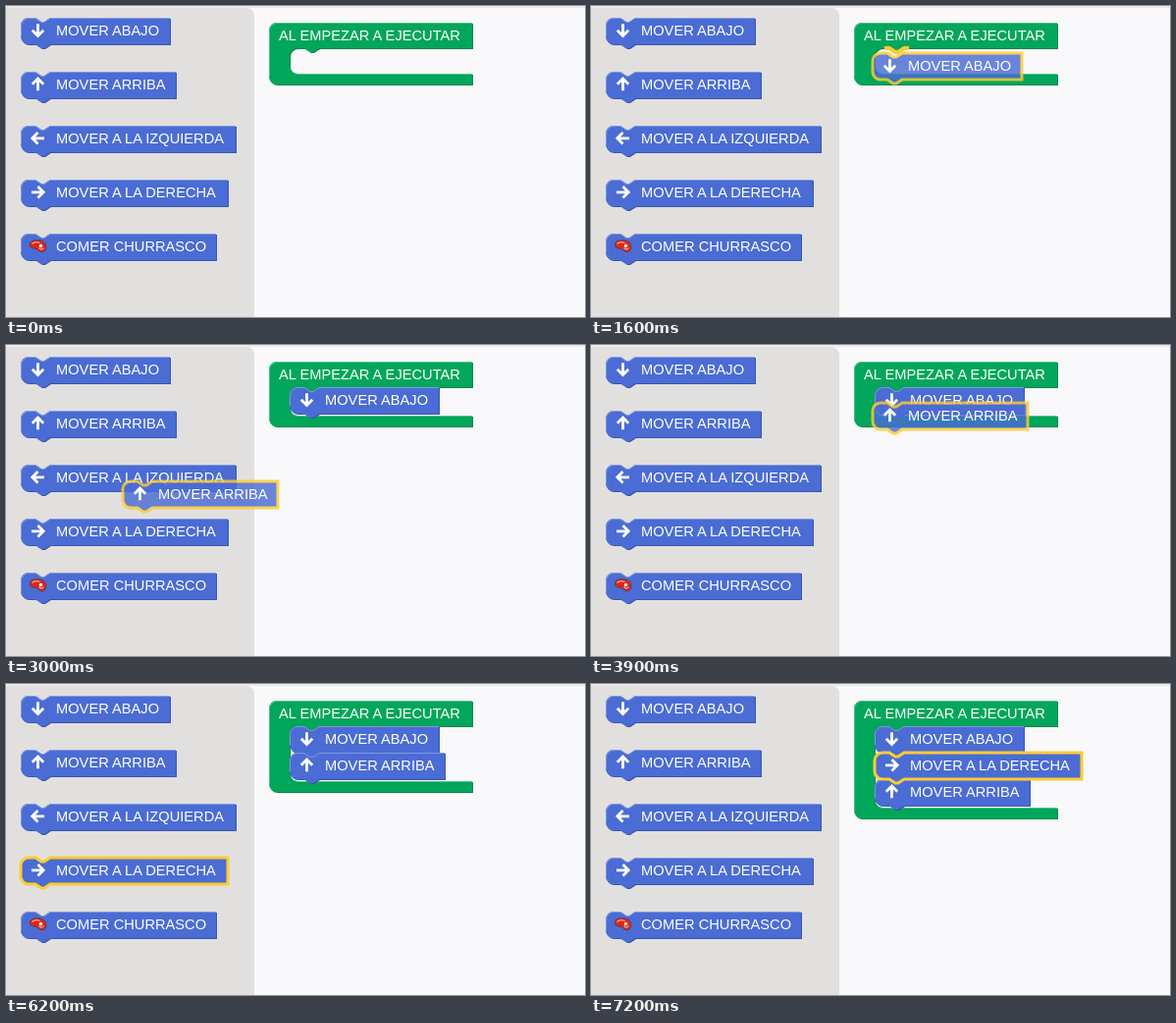
These frames come from a looping animation (590x317 px, 8 s). An HTML page:

```html
<!DOCTYPE html>
<html lang="es">
<head>
<meta charset="utf-8">
<title>Bloques</title>
<style>
  html, body { margin: 0; width: 100%; height: 100%; overflow: hidden; background: #f9f8fa; }
  svg { display: block; width: 590px; height: 317px; }
  text { font: 14.667px "Liberation Sans", Arial, sans-serif; fill: #fff; }
</style>
</head>
<body>
<svg id="stage" viewBox="0 0 590 317"></svg>
<script>
const LOOP = 8000, STEP = 100, ROW = 27, YELLOW = '#fc3';
const BLUE = { fill: '#4a6cd4', dark: '#3b56aa', light: '#8098e1' };
const GREEN = { fill: '#00a65a', dark: '#008548', light: '#4dc18c' };
const SLOT = { x: 289, y: 43 };

const DOWN = 0, UP = 1, LEFT = 2, RIGHT = 3, EAT = 4;
const KINDS = [
  { label: 'MOVER ABAJO', width: 152, turn: 90 },
  { label: 'MOVER ARRIBA', width: 158, turn: -90 },
  { label: 'MOVER A LA IZQUIERDA', width: 219, turn: 180 },
  { label: 'MOVER A LA DERECHA', width: 211, turn: 0 },
  { label: 'COMER CHURRASCO', width: 199 }
];

// Palette outlines: [kind, from, to]
const PALETTE_GLOW = [
  [DOWN, 100, 900], [UP, 2400, 2900], [LEFT, 4800, 4900],
  [RIGHT, 5000, 5400], [EAT, 5700, 5900], [RIGHT, 5900, 6400]
];
// Outlines of dropped blocks: [kind, from, to]
const STACK_GLOW = [[DOWN, 1900, 2700], [UP, 4300, 6200], [RIGHT, 7100, LOOP]];

// path entries: [time, x, y]; hint: when the notch of the given row lights up
const DRAGS = [
  { kind: DOWN, end: 1900, hint: 1500, row: 0,
    path: [[900, 30, 22], [1000, 65, 52], [1200, 140, 91], [1400, 245, 66], [1600, 287, 48], [1800, 288, 46]] },
  { kind: UP, end: 4300, hint: 4000, row: 1,
    path: [[2900, 60, 102], [3000, 119, 139], [3100, 170, 141], [3300, 240, 118], [3500, 279, 86], [3700, 287, 65], [3900, 287, 59], [4200, 288, 65]] },
  { kind: RIGHT, end: 7100, hint: 6900, row: 1,
    path: [[6400, 50, 168], [6600, 165, 123], [6800, 270, 84], [6900, 285, 75]] }
];

const during = (t, from, to) => t >= from && t < to;
const glows = (list, kind, t) => list.some(([k, from, to]) => k === kind && during(t, from, to));

function along(path, t) {
  const next = path.findIndex(point => point[0] > t);
  if (next < 0) return path.at(-1).slice(1);
  const [t0, x0, y0] = path[next - 1], [t1, x1, y1] = path[next];
  const k = (t - t0) / (t1 - t0);
  return [x0 + (x1 - x0) * k, y0 + (y1 - y0) * k];
}

function stackAt(t) {
  if (t < 1900) return [];
  if (t < 4300) return [DOWN];
  return t < 7100 ? [DOWN, UP] : [DOWN, RIGHT, UP];
}

function icon(turn) {
  if (turn === undefined) return `<g transform="translate(17.5 12.5)">
    <path d="M-8-1C-8-7 1-6 4-5S9-1 8 3 3 7 0 4-8 4-8-1Z" fill="#d9281f" stroke="#73362f"/>
    <path d="M-6-2Q-3-5 2-3M1 2Q4 5 6 2" fill="none" stroke="#f4a59b" stroke-width="1.3"/>
    <circle cx="3" cy="0" r="1.7" fill="#fff"/></g>`;
  return `<path transform="translate(17.5 12.8) rotate(${turn})" d="M-6.5 0H5M0-5.7 5.7 0 0 5.7"
    fill="none" stroke="#fff" stroke-width="2.8"/>`;
}

function block(kind, x, y, { glow = false, dragged = false } = {}) {
  const { label, width, turn } = KINDS[kind];
  const top = `a8 8 0 0 1 8-8H15l6 4h3l6-4H${width}`;
  const shape = `M0 8${top}V${ROW}H30l-6 4h-3l-6-4H8a8 8 0 0 1-8-8Z`;
  const edge = glow ? `stroke="${YELLOW}" stroke-width="3"` : '';
  return `<g transform="translate(${x} ${y})">
    ${glow ? '' : `<path d="${shape}" transform="translate(1 1)" fill="${BLUE.dark}"/>`}
    <path d="${shape}" fill="${BLUE.fill}" ${edge} opacity="${dragged ? 0.82 : 1}"/>
    ${glow ? '' : `<path d="M.5 ${ROW - 8}V8.5${top}" fill="none" stroke="${BLUE.light}"/>`}
    ${icon(turn)}<text x="36" y="18">${label}</text></g>`;
}

function container(count) {
  const floor = count ? 28 + ROW * count : 52, bottom = floor + 11;
  const shape = `M0 8a8 8 0 0 1 8-8H207V26H51l-6 4h-3l-6-4H29a8 8 0 0 0-8 8V${floor - 8}
    a8 8 0 0 0 8 8H207V${bottom}H8a8 8 0 0 1-8-8Z`;
  return `<g transform="translate(268 17)">
    <path d="${shape}" transform="translate(1 1)" fill="${GREEN.dark}"/>
    <path d="${shape}" fill="${GREEN.fill}"/>
    <path d="M.5 ${bottom - 8}V8.5a8 8 0 0 1 8-8H207M23 ${floor - 3}a8 8 0 0 0 6 3.5H207"
      fill="none" stroke="${GREEN.light}"/>
    <text x="10" y="18">AL EMPEZAR A EJECUTAR</text></g>`;
}

function scene(t) {
  const stack = stackAt(t);
  const drag = DRAGS.find(d => during(t, d.path[0][0], d.end));
  const placed = stack.map((kind, row) => ({ kind, row, glow: glows(STACK_GLOW, kind, t) }))
    .sort((a, b) => a.glow - b.glow);

  let out = '<path d="M0 0H590V2H0Z" fill="#ebeaed"/><path d="M0 2H245a8 8 0 0 1 8 8V317H0Z" fill="#e1e0de"/>';
  out += container(stack.length);
  out += placed.map(({ kind, row, glow }) => block(kind, SLOT.x, SLOT.y + ROW * row, { glow })).join('');
  out += KINDS.map((_, kind) => block(kind, 15, 12 + 55 * kind, { glow: glows(PALETTE_GLOW, kind, t) })).join('');
  if (drag) {
    if (t >= drag.hint) out += `<path d="M${SLOT.x + 10} ${SLOT.y + ROW * drag.row}h5l6 4h3l6-4h5"
      fill="none" stroke="${YELLOW}" stroke-width="4"/>`;
    out += block(drag.kind, ...along(drag.path, t), { glow: true, dragged: true });
  }
  return out;
}

const stage = document.getElementById('stage');
const start = performance.now();
let shown = -1;
function play() {
  const elapsed = (performance.now() - start) % LOOP;
  const t = Math.floor(elapsed / STEP) * STEP;
  if (t !== shown) stage.innerHTML = scene(shown = t);
  requestAnimationFrame(play);
}
play();
</script>
</body>
</html>
```
